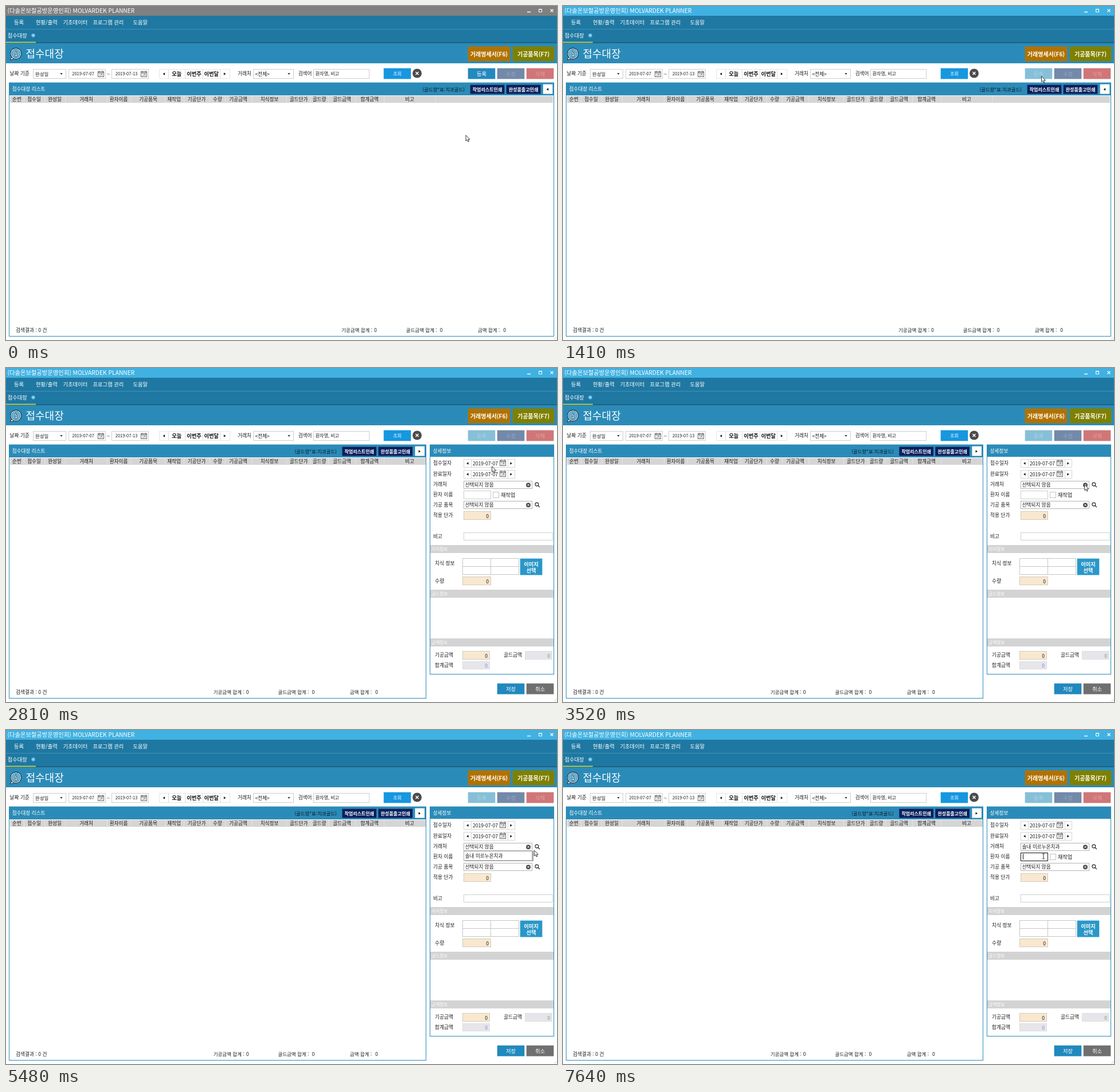
These frames come from a looping animation (961 px wide and 583 px high, 8 s). An HTML page:

```html
<!DOCTYPE html>
<html lang="ko">
<head>
<meta charset="utf-8">
<title>접수대장</title>
<style>
html, body { margin: 0; width: 100%; height: 100%; overflow: hidden; background: #fff; }
svg { display: block; width: 100%; height: 100%; }
text { font-family: 'Noto Sans CJK KR', 'Noto Sans KR', 'Noto Sans CJK JP', 'Noto Sans CJK', sans-serif; white-space: pre; }
</style>
</head>
<body>
<svg id="stage" viewBox="0 0 961 583" preserveAspectRatio="none"></svg>
<script>
const LOOP = 8000;
const NS = 'http://www.w3.org/2000/svg';
const BLUE = '#2b8bb8', INK = '#1c1c1c', EDGE = '#cfcfcf', CREAM = '#f9e8d0';
const APP = '(다솔온보철공방운영인회) MOLVARDEK PLANNER';
const CLINIC = '솔내 미르누온치과';
const EMPTY = '선택되지 않음';
let layer = document.getElementById('stage');

function add(tag, attrs) {
  const el = document.createElementNS(NS, tag);
  for (const k in attrs) el.setAttribute(k, attrs[k]);
  return layer.appendChild(el);
}
function group(draw) {
  const outer = layer, g = add('g', {});
  layer = g;
  draw();
  layer = outer;
  return g;
}
const fillBox = (x, y, w, h, fill) => add('rect', { x, y, width: w, height: h, fill });
const frame = (x, y, w, h, stroke = EDGE, fill = '#fff') =>
  add('rect', { x: x + .5, y: y + .5, width: w - 1, height: h - 1, fill, stroke });
const path = (d, stroke, width = 1, fill = 'none') => add('path', { d, stroke, 'stroke-width': width, fill });

// Text placed by its vertical middle.
function label(x, mid, str, size = 8.6, fill = INK, anchor = 'start', weight = 400) {
  const el = add('text', { x, y: mid + size * .37, 'font-size': size, fill, 'text-anchor': anchor, 'font-weight': weight });
  el.textContent = str;
  return el;
}
const centred = (x, mid, str, size, fill, weight) => label(x, mid, str, size, fill, 'middle', weight);

// Buttons have soft edges a little outside the pixel grid.
function button(x, y, w, h, str, fill, size = 9.3, color = '#fff', weight = 500) {
  const bg = fillBox(x - .3, y - .4, w + .6, h + .8, fill);
  const txt = centred(x + w / 2, y + h / 2 + .4, str, size, color, weight);
  return { bg, txt };
}
function arrow(x, y, dir, r = 2.2) {
  const d = dir === 'down' ? `M${x - r} ${y - 1.2}h${2 * r}l${-r} 2.6z`
    : dir === 'left' ? `M${x + 1.6} ${y - r}v${2 * r}l-3.4 ${-r}z`
    : `M${x - 1.6} ${y - r}v${2 * r}l3.4 ${-r}z`;
  return add('path', { d, fill: '#111' });
}
function calendar(x, y) {
  frame(x, y + 1, 11, 10, '#666');
  path(`M${x} ${y + 3.5}h11M${x + 2.5} ${y}v2.5M${x + 8.5} ${y}v2.5`, '#666');
  centred(x + 5.5, y + 7.2, '14', 6, '#444');
}
function cross(x, y, r, fill, k, width) {
  add('circle', { cx: x, cy: y, r, fill });
  path(`M${x - k} ${y - k}l${2 * k} ${2 * k}M${x + k} ${y - k}l${-2 * k} ${2 * k}`, '#fff', width);
}
function lens(x, y) {
  add('circle', { cx: x - .7, cy: y - .8, r: 2.9, fill: 'none', stroke: '#222', 'stroke-width': 1.1 });
  path(`M${x + 1.4} ${y + 1.3}l2.9 2.9`, '#222', 1.2);
}
const show = (el, on) => el.setAttribute('visibility', on ? 'visible' : 'hidden');

// Window bars
const titleBar = fillBox(0, 0, 961, 17, '#808080');
label(2.5, 8, APP, 10.3, '#fff');
path('M909 10.5h6', '#fff', 1.5);
path('M929.5 5.5h5v5h-5zM929 6h6', '#fff');
path('M949.5 5.5l5 5M954.5 5.5l-5 5', '#fff', 1.2);
fillBox(0, 17, 961, 47, '#1f78a2');
fillBox(0, 40, 961, 1, '#3d93ba');
[[14, '등록'], [52, '현황/출력'], [99.5, '기초데이터'], [151.5, '프로그램 관리'], [221.5, '도움말']]
  .forEach(([x, s]) => label(x, 28.7, s, 9.3, '#fff'));
label(2.7, 51.5, '접수대장', 9.3, '#fff');
cross(47.5, 51.3, 3.4, '#55b5e8', 1.3, 1);
fillBox(0, 63, 961, 2, '#1b6384');
fillBox(0, 62.6, 52, 1.6, '#d3dc38');
fillBox(0, 65, 961, 35, BLUE);
path('M9.8 89l-2.3 5.2 6.5-2', '#14303f', 1, '#fff');
add('circle', { cx: 17.3, cy: 83, r: 9.6, fill: '#fff', stroke: '#14303f', 'stroke-width': 1.1 });
add('circle', { cx: 17.3, cy: 83, r: 7.8, fill: '#62b4da', stroke: '#2d5870', 'stroke-width': .6 });
for (const [color, width] of [['#14303f', 3], ['#fff', 1.4]]) {
  path('M15.6 81.5h2v6M15.2 87.4h4.4M16.6 78.6h1.2', color, width);
}
label(34.5, 83, '접수대장', 18, '#fff');
button(806, 71, 73, 25, '거래명세서(F6)', '#b17200', 10, '#fff', 700);
button(884, 71, 72, 25, '기공품목(F7)', '#808000', 10, '#fff', 700);

// Filter row
label(6.5, 118, '날짜 기준', 8.7);
frame(47, 110, 58, 17);
label(51, 118.4, '완성일', 8.4);
arrow(96.5, 118.4, 'down');
[109, 184.5].forEach((x, i) => {
  frame(Math.floor(x), 110, 65, 17);
  label(x + 6.3, 118.7, i ? '2019-07-13' : '2019-07-07', 7.5);
  calendar(Math.floor(x) + 51, 113);
});
label(176, 118.5, '~', 9);
frame(267, 110, 124, 17, '#e6e6e6');
path('M283.5 110v17M312.5 110v17M343.5 110v17M373.5 110v17', '#dcdcdc');
arrow(275.5, 118.5, 'left');
arrow(381.5, 118.5, 'right');
[[297.8, '오늘'], [328, '이번주'], [358.3, '이번달']].forEach(([x, s]) => centred(x, 118.5, s, 9.3, '#111', 600));
label(404, 118, '거래처', 8.6);
frame(431, 110, 71, 17);
label(434.5, 118.5, '<전체>', 8.6);
arrow(493.5, 118.4, 'down');
label(509.7, 118, '검색어', 8.6);
frame(536, 110, 98, 17);
label(539.7, 118.5, '환자명, 비고', 8);
button(659, 109, 47, 18, '조회', '#1797df', 8);
cross(717, 117.5, 8, '#4b4b4b', 2.5, 1.6);
const register = button(806, 109, 47, 18, '등록', '#2389be');
button(857, 109, 47, 18, '수정', '#7389a9', 9.3, '#97a9c0');
button(908, 109, 47, 18, '삭제', '#d07678', 9.3, '#dfa0a2');

// Order list
frame(5, 134, 951, 443, BLUE);
fillBox(5, 133.5, 951, 22.5, BLUE);
label(10.7, 144.5, '접수대장 리스트', 8.6, '#fff');
fillBox(7, 157, 947, 12, '#d5d5d5');
[31, 67, 103, 176, 217, 277, 310, 355, 382, 428, 489, 531, 562, 609, 659, 749]
  .forEach(x => fillBox(x, 157, 1, 12, '#e3e3e3'));
const columns = { 순번: 19, 접수일: 49, 완성일: 85, 거래처: 140, 환자이름: 196.5, 기공품목: 248, 재작업: 293,
  기공단가: 332.5, 수량: 369, 기공금액: 405, 치식정보: 459.5, 골드단가: 510.5, 골드량: 546.5,
  골드금액: 586, 합계금액: 634, 비고: 704 };
for (const name in columns) centred(columns[name], 162.8, name, 8.6, INK);
label(17, 566, '검색결과 : 0 건', 8.7);

// Detail panel
function dateField(y) {
  frame(798, y, 90, 15, '#d6d6d6');
  path(`M811.5 ${y}v15M875.5 ${y}v15`, '#d6d6d6');
  arrow(805, y + 7.5, 'left');
  arrow(881, y + 7.5, 'right');
  label(814, y + 7.5, '2019-07-07', 8.6);
  calendar(861, y + 1);
}
function picker(y) {
  frame(798, y, 120, 14, '#b4b4b4');
  const txt = label(800.7, y + 7, EMPTY, 8.6);
  cross(911, y + 7.2, 4, '#505050', 1.5, 1);
  lens(926.5, y + 6.8);
  return txt;
}
function amount(x, y, w, h, fill = CREAM, color = INK) {
  frame(x, y, w, h, fill === CREAM ? '#d2cabd' : '#dedee2', fill);
  label(x + w - 4, y + h / 2 + 1, '0', 8.6, color, 'end');
}
let client, patient;
const detail = group(() => {
  fillBox(733, 130, 228, 453, '#fff');
  fillBox(732, 134, 1, 443, BLUE);
  frame(739, 134, 217, 401, BLUE);
  fillBox(739, 133.5, 217, 21.5, BLUE);
  label(744.7, 144.5, '상세정보', 8.6, '#fff');
  [[166, '접수일자'], [184.5, '완료일자'], [202.5, '거래처'], [220.3, '환자 이름'], [238.5, '기공 품목'],
    [256.7, '적용 단가'], [293.3, '비고']].forEach(([y, s]) => label(745, y, s, 8.7));
  dateField(159);
  dateField(178);
  client = picker(197);
  patient = frame(798, 214, 48, 15, '#cbcbcb');
  frame(849, 216, 11, 11, '#c4c4c4');
  label(863, 221.5, '재작업', 9.1);
  picker(232);
  amount(798, 250, 48, 15);
  frame(798, 287, 156, 14);
  [[309, '치식정보'], [387, '골드정보'], [472, '금액정보']].forEach(([y, s]) => {
    fillBox(740, y, 215, 14, '#d3d3d3');
    label(742.5, y + 7.2, s, 7.5, '#fff');
  });
  label(748, 340.5, '치식 정보', 8.7);
  frame(796, 332, 99, 29, '#c6c6c6');
  path('M845.5 332v29M796 346.5h99', '#c6c6c6');
  button(897, 333, 38, 28, '', '#2a97c8');
  centred(916, 342.3, '이미지', 9.2, '#fff', 600);
  centred(916, 354, '선택', 9.2, '#fff', 600);
  label(748, 371.5, '수량', 8.9);
  amount(796, 364, 50, 15);
  label(748, 501.2, '기공금액', 8.7);
  amount(796, 494, 48, 15);
  label(868, 501.2, '골드금액', 8.7);
  amount(905, 494, 48, 15, '#e6e6ea', '#8a8a8a');
  label(748, 518.8, '합계금액', 8.7);
  amount(796, 512, 48, 14, '#e6e6ea', '#7f83f2');
  button(857, 551, 47, 18, '저장', '#2089bd');
  button(908, 551, 47, 18, '취소', '#6f6f6f');
});

// Parts tied to the right edge of the list
let openMark, closeMark;
const tail = group(() => {
  label(726.5, 145.8, '(골드량*표:치과골드)', 8.4, '#0b1a24');
  button(810, 138, 59, 15, '작업리스트인쇄', '#0a1f5c', 8, '#fff', 600);
  button(873, 138, 59, 15, '완성품출고인쇄', '#0a1f5c', 8, '#fff', 600);
  button(937, 137, 16, 16, '', '#fff');
  openMark = arrow(944.5, 145.5, 'left');
  closeMark = arrow(944.5, 145.5, 'right');
  [[585, '기공금액 합계 :', 642], [697.7, '골드금액 합계 :', 756.7], [823, '금액 합계 :', 867.3]].forEach(([x, s, v]) => {
    label(x, 566, s, 8.5);
    label(v, 566, '0', 8.6);
  });
});
path('M956 582l4-4M958.5 582l1.5-1.5', '#c8c8c8', .8);

// Drop-down, caret and pointer
let shade, sheet, choice, choiceText;
const drop = group(() => {
  shade = fillBox(801, 211, 119, 2, '#a9a9a9');
  sheet = frame(798, 211, 120, 17, '#b0b0b0');
  choice = fillBox(799, 212, 118, 15, '#cde8f6');
  choiceText = label(800.7, 219.5, CLINIC, 8.6);
});
const caret = fillBox(801, 199, 1, 10, '#111');
const hand = add('path', { d: 'M0 0V10L2.3 7.9L3.8 11.4L5.5 10.7L4 7.3H7Z', fill: '#fff', stroke: '#222', 'stroke-width': .9 });
const beam = add('path', { d: 'M-2 -4.5H-.5L0 -4L.5 -4.5H2M0 -4V4M-2 4.5H-.5L0 4L.5 4.5H2', fill: 'none', stroke: '#222', 'stroke-width': 1 });

// Pointer moves: first step, last step, number of steps, bend, end
const START = [802, 225.5];
const moves = [
  [460, 840, 6, [898, 165], [842, 128]],
  [1010, 1080, 2, [838, 125], [834.5, 122.5]],
  [2170, 2880, 9, [775, 222], [866, 160]],
  [2980, 3350, 6, [885, 185], [911, 203]],
  [3520, 3520, 1, [910, 203], [909.8, 203.7]],
  [4280, 4450, 3, [920, 203], [929, 203.7]],
  [5310, 5840, 7, [915, 216], [903.8, 218]],
  [6630, 7410, 11, [870, 228], [838, 220.5]]
];
function stepped(t, from, to, n) {
  if (t < from) return 0;
  if (t >= to) return 1;
  return (Math.floor((t - from) / (to - from) * (n - 1)) + 1) / n;
}
function pointerAt(t) {
  let p = START;
  for (const [from, to, n, bend, end] of moves) {
    if (t < from) break;
    const u = stepped(t, from, to, n), v = 1 - u;
    p = p.map((a, i) => v * v * a + 2 * u * v * bend[i] + u * u * end[i]);
  }
  return p;
}

function render(t) {
  const [x, y] = pointerAt(t);
  const wide = t < 1710, chosen = t >= 6300, focus = t >= 7510;
  titleBar.setAttribute('fill', t < 1410 ? '#808080' : '#41b1e1');
  const [bg, fg] = t < 1010 ? ['#2389be', '#fff'] : t < 1080 ? ['#a5c7d6', '#fff']
    : t < 1410 ? ['#e0e0e0', '#f4f4f4'] : ['#87bfd8', '#a9d2e4'];
  register.bg.setAttribute('fill', bg);
  register.txt.setAttribute('fill', fg);

  show(detail, !wide);
  show(openMark, wide);
  show(closeMark, !wide);
  tail.setAttribute('transform', `translate(${wide ? 0 : -223.3} 0)`);

  client.textContent = chosen ? CLINIC : EMPTY;
  patient.setAttribute('stroke', focus ? '#111' : '#cbcbcb');

  const open = t >= 4910 && !chosen;
  drop.setAttribute('display', open ? 'inline' : 'none');
  if (open) {
    const h = t < 5010 ? 1 : t < 5080 ? 9 : 17;
    sheet.setAttribute('height', Math.max(.5, h - 1));
    shade.setAttribute('height', h + 1);
    show(choiceText, h === 17);
    show(choice, h === 17 && x < 917 && y > 211);
  }

  const blink = (t - 6300) % 1060 < 530;
  show(caret, focus ? t >= 7640 : chosen && blink);
  caret.setAttribute('x', focus ? 802 : 801);
  caret.setAttribute('y', focus ? 216 : 199);

  const typing = t > 6630 && x < 846;
  show(hand, !typing);
  show(beam, typing);
  (typing ? beam : hand).setAttribute('transform', `translate(${x} ${y})`);
}
function tick() {
  render(performance.now() % LOOP);
  requestAnimationFrame(tick);
}
tick();
</script>
</body>
</html>
```
